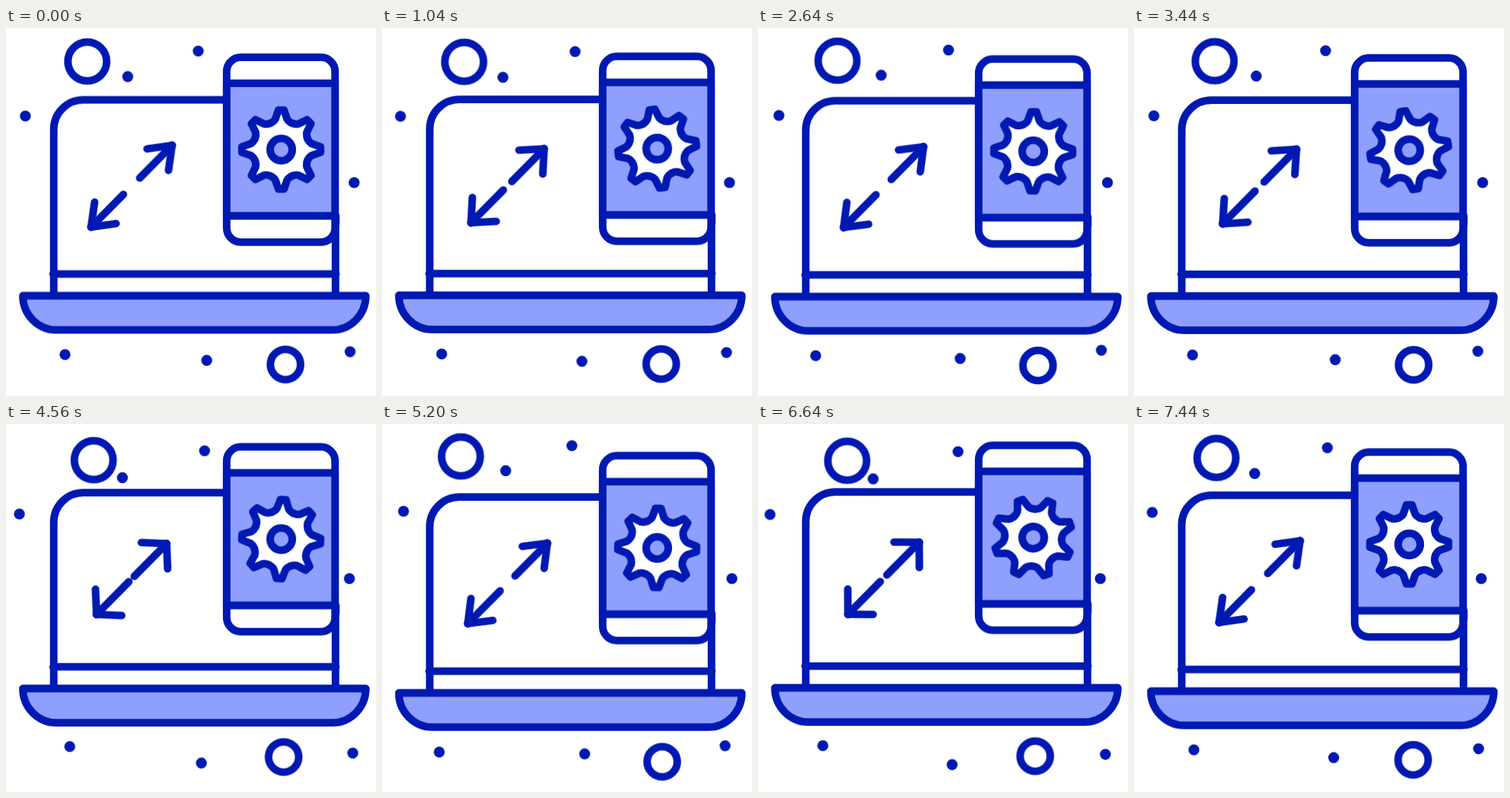
These frames come from a looping animation (527 by 523 pixels, 7.52 s). An HTML page without scripts:

```html
<!DOCTYPE html>
<html lang="en">
<head>
<meta charset="utf-8">
<title>Responsive devices</title>
<style>
  :root {
    --ink: #0019b2;
    --tint: #8e9ffe;
    --loop: 2506.667ms;
  }
  html, body { margin: 0; width: 100%; height: 100%; overflow: hidden; background: #fff; }
  svg { display: block; width: 100%; height: 100%; }

  .line { fill: none; stroke: var(--ink); stroke-width: 10.8; stroke-linecap: round; stroke-linejoin: round; }
  .white { fill: #fff; }
  .tint { fill: var(--tint); }
  .flat { stroke: none; }
  .dot { fill: var(--ink); }

  /* everything drifts on one shared sine; --x and --y are its reach */
  .bob {
    animation: bob calc(var(--loop) / 2) cubic-bezier(.37, 0, .63, 1) -2016.667ms infinite alternate;
  }
  @keyframes bob {
    from { transform: translate(var(--x), var(--y)); }
    to { transform: translate(calc(-1 * var(--x)), calc(-1 * var(--y))); }
  }

  .gear { animation: turn var(--loop) cubic-bezier(.5, 0, .5, 1) infinite; }
  @keyframes turn {
    0%, 92%, 100% { transform: rotate(0deg); }
    46% { transform: rotate(38deg); }
  }

  .arrow { animation: pull var(--loop) linear infinite; }
  .barb { animation: open var(--loop) linear infinite; }
  .barb.a { --s: 1; }
  .barb.b { --s: -1; }
  @keyframes pull {
    0%, 93%, 100% { transform: translate(0, 0); }
    36% { transform: translate(-5px, 5px); }
    41.5% { transform: translate(-5.6px, 5.6px); }
    76.5% { transform: translate(-7.6px, 7.6px); }
    82% { transform: translate(-7.8px, 7.8px); }
  }
  @keyframes open {
    0%, 93%, 100% { transform: rotate(0deg); }
    36% { transform: rotate(calc(var(--s) * 4.3deg)); }
    41.5% { transform: rotate(calc(var(--s) * 5deg)); }
    76.5% { transform: rotate(calc(var(--s) * 10.2deg)); }
    82% { transform: rotate(calc(var(--s) * 10.5deg)); }
  }
</style>
</head>
<body>
<svg viewBox="0 0 527 523" preserveAspectRatio="none">
  <defs>
    <path id="tooth" d="M-15.5-37.4Q-11-39.3-8.3-43.4L-4-56H4L8.3-43.4Q11-39.3 15.5-37.4"/>
  </defs>

  <!-- laptop -->
  <g class="bob line" style="--x:0px;--y:4.3px">
    <path d="M68 379V143A42 42 0 0 1 110 100.7H314M469.3 379V265M67 348.2H470"/>
    <path class="tint" d="M24 379H512.5A48 48.7 0 0 1 464.5 427.7H72A48 48.7 0 0 1 24 379Z"/>
    <g transform="translate(236.5 165.3)">
      <g class="arrow">
        <path d="M0 0L-46 46.4"/>
        <path class="barb a" d="M0 0L-35.5 5"/>
        <path class="barb b" d="M0 0L-5 35.5"/>
      </g>
    </g>
    <g transform="translate(121.2 281.5) rotate(180)">
      <g class="arrow">
        <path d="M0 0L-46 46.4"/>
        <path class="barb a" d="M0 0L-35.5 5"/>
        <path class="barb b" d="M0 0L-5 35.5"/>
      </g>
    </g>
  </g>

  <!-- phone -->
  <g class="bob line" style="--x:0px;--y:8.7px">
    <rect class="white" x="314.3" y="38.7" width="154.4" height="262.6" rx="20"/>
    <path class="tint" d="M314.3 75.7H468.7V264H314.3Z"/>
    <path d="M469.8 264v11"/>
    <g transform="translate(392 169.8)">
      <g class="gear">
        <circle class="white flat" r="38"/>
        <g class="white">
          <use href="#tooth"/>
          <use href="#tooth" transform="rotate(45)"/>
          <use href="#tooth" transform="rotate(90)"/>
          <use href="#tooth" transform="rotate(135)"/>
          <use href="#tooth" transform="rotate(180)"/>
          <use href="#tooth" transform="rotate(225)"/>
          <use href="#tooth" transform="rotate(270)"/>
          <use href="#tooth" transform="rotate(315)"/>
        </g>
        <circle class="tint" r="15.8"/>
      </g>
    </g>
  </g>

  <!-- rings -->
  <g class="line">
    <circle class="bob" style="--x:-8.7px;--y:-3.6px" cx="118.7" cy="48.8" r="27.6"/>
    <circle class="bob" style="--x:2.5px;--y:4.7px" cx="397.2" cy="476.6" r="21.5"/>
  </g>

  <!-- dots -->
  <g class="dot">
    <circle class="bob" style="--x:8px;--y:-2.7px" cx="24.8" cy="126" r="7.8"/>
    <circle class="bob" style="--x:-8.6px;--y:-5px" cx="276.7" cy="34.5" r="7.8"/>
    <circle class="bob" style="--x:7.2px;--y:-6.9px" cx="170.9" cy="71.4" r="7.8"/>
    <circle class="bob" style="--x:6.4px;--y:0px" cx="493.7" cy="219.8" r="7.8"/>
    <circle class="bob" style="--x:-6.4px;--y:5.4px" cx="86.2" cy="462.3" r="7.8"/>
    <circle class="bob" style="--x:7.2px;--y:-9px" cx="283.4" cy="475.4" r="7.8"/>
    <circle class="bob" style="--x:-3.6px;--y:-7.2px" cx="491.3" cy="462.6" r="7.8"/>
  </g>
</svg>
</body>
</html>
```
